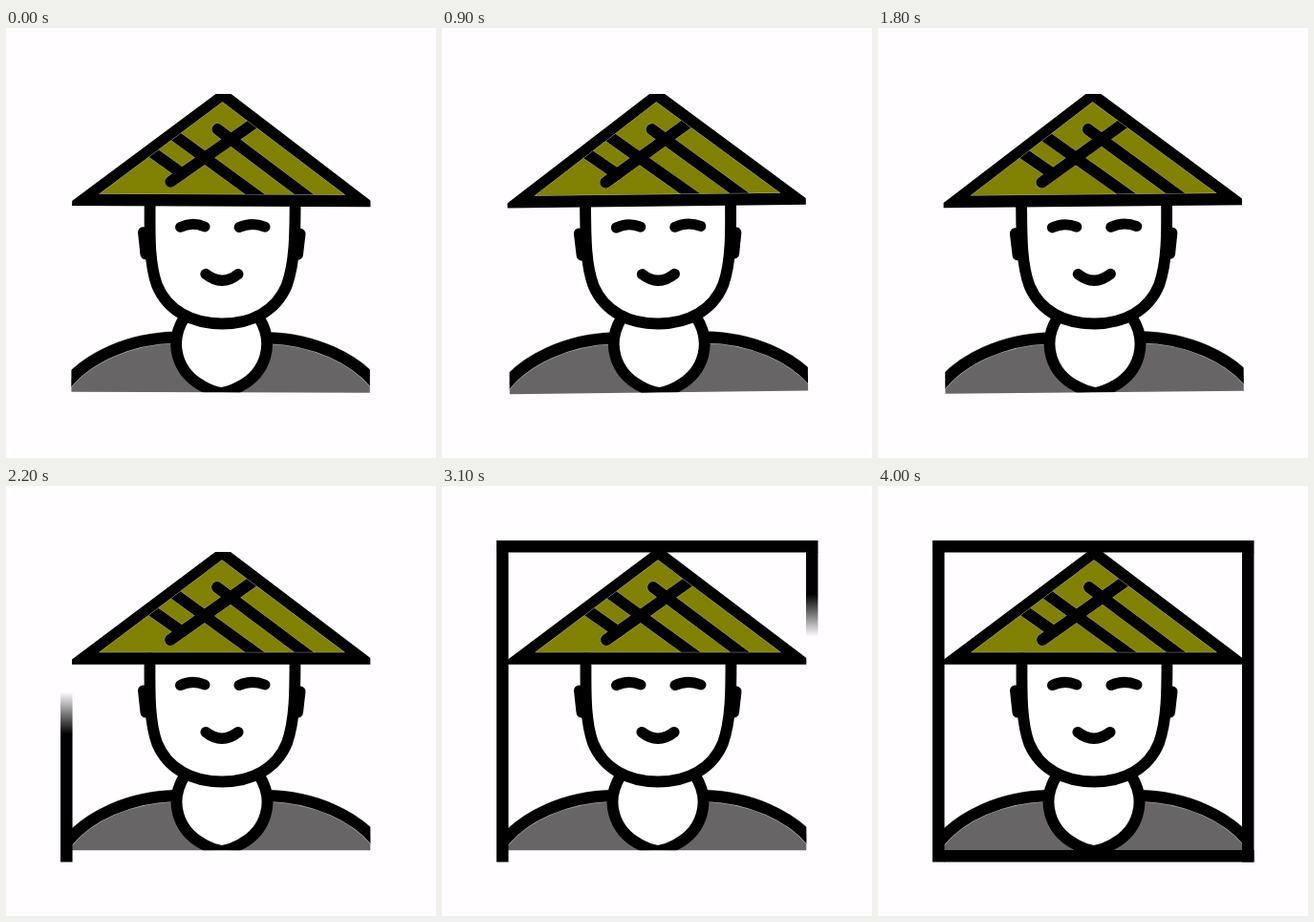
An HTML page with a canvas for the animation above (4100 ms loop, 450 by 450 pixels).

```html
<!DOCTYPE html>
<html lang="en">
<head>
<meta charset="utf-8">
<title>Portrait in a straw hat</title>
<style>
  html, body { margin: 0; height: 100%; overflow: hidden; background: #fffdff; }
  canvas { display: block; width: 450px; height: 450px; }
</style>
</head>
<body>
<canvas id="stage" width="450" height="450"></canvas>
<script>
const ctx = document.getElementById('stage').getContext('2d');
const LOOP = 4100, STEP = 100;
const INK = '#000', STRAW = '#808002', SHIRT = '#686567', PAPER = '#fffdff', EDGE = '#c0bfb4';

const line = (d, width, cap = 'round', color = INK) => {
  ctx.lineWidth = width;
  ctx.lineCap = cap;
  ctx.strokeStyle = color;
  ctx.stroke(new Path2D(d));
};
const fill = (d, color, rule = 'nonzero') => {
  ctx.fillStyle = color;
  ctx.fill(new Path2D(d), rule);
};

// Times at which the swing passes through upright; the sign alternates.
const UPRIGHT = [-20, 575, 940, 1390, 1840];
function swing(t) {
  const i = UPRIGHT.findIndex((z, k) => t >= z && t < UPRIGHT[k + 1]);
  if (i < 0) return 0;
  const phase = (t - UPRIGHT[i]) / (UPRIGHT[i + 1] - UPRIGHT[i]);
  return (i % 2 ? -2 : 2) * Math.sin(Math.PI * phase) * Math.PI / 180;
}

function drawShirt() {
  const left = 'M62 375C85 345 130 325 178 324';
  const right = 'M390 375C367 345 322 325 274 324';
  fill(left + 'L226 381L62 390Z', SHIRT);
  fill(right + 'L226 381L390 390Z', SHIRT);
  fill('M178 324H274L226 382Z', SHIRT);
  for (const d of [left, right]) line(d, 13, 'butt', EDGE);
  for (const d of [left, right]) line(d, 12, 'butt');
}

function drawHead() {
  const neck = 'M187 303C170 330 180 360 205 374Q215 380 226 382' +
               'Q237 380 247 374C272 360 282 330 265 303';
  fill(neck, '#fff');
  line(neck, 11.8);

  line('M143.5 214L146 237', 11);
  line('M308 215L305.5 237', 11);

  const face = 'M150.5 180C150.5 215 149.5 245 158 269C169 296 195 309.5 226 309.5' +
               'C257 309.5 283 296 294 269C302.5 245 302.5 215 302.5 180';
  fill(face, '#fff');
  line(face, 11.8);

  line('M182.5 208.5Q195 202.5 208 208', 11);
  line('M244 208.5Q257 202.5 271 208', 11);
  line('M209 257.5Q226 271 243 257.5', 11.2);
}

function drawHat() {
  const opening = 'M97 174.3L226 77.3L355 174.3Z';
  fill(opening, STRAW);
  const weave = [
    'M172 161L264 96',
    'M175 112L266 178',
    'M221 106L318 178.5',
    'M150 128.5L184 152.5'
  ];
  ctx.save();
  ctx.clip(new Path2D(opening));
  for (const d of weave) line(d, 12.6, 'round', EDGE);
  for (const d of weave) line(d, 12);
  ctx.restore();
  line(opening, 0.8, 'butt', EDGE);
  fill('M65 184.5L219 69H235L386 183.5V186.7H65Z' + opening, INK, 'evenodd');
}

function drawPerson(angle) {
  ctx.save();
  ctx.translate(225, 225);
  ctx.rotate(angle);
  ctx.translate(-225, -225);
  ctx.beginPath();
  ctx.rect(69, 68.5, 312.3, 312.8);
  ctx.clip();
  drawShirt();
  drawHead();
  drawHat();
  ctx.restore();
}

// Soft-edged wipe of one frame side, running from (x0, y0) to (x1, y1).
function drawSide(t, start, x0, y0, x1, y1) {
  const p = Math.min((t - start) / 500, 1);
  if (p <= 0) return;
  const soft = 44, length = Math.hypot(x1 - x0, y1 - y0);
  const ux = (x1 - x0) / length, uy = (y1 - y0) / length;
  const tip = p * (length + soft), solid = tip - soft;
  const fade = ctx.createLinearGradient(
    x0 + ux * solid, y0 + uy * solid, x0 + ux * tip, y0 + uy * tip);
  fade.addColorStop(0, 'rgba(0,0,0,1)');
  fade.addColorStop(1, 'rgba(0,0,0,0)');
  line(`M${x0} ${y0}L${x1} ${y1}`, 12.5, 'butt', fade);
}

function render(t) {
  ctx.fillStyle = PAPER;
  ctx.fillRect(0, 0, 450, 450);
  drawPerson(swing(t));
  drawSide(t, 1960, 63.3, 393.5, 63.3, 67);
  drawSide(t, 2463, 57, 63.2, 393.5, 63.2);
  drawSide(t, 2980, 387.2, 69, 387.2, 393.5);
  drawSide(t, 3500, 393.5, 387.2, 69, 387.2);
}

let began;
function tick(now) {
  began ??= now;
  const t = (now - began) % LOOP;
  render(Math.floor(t / STEP) * STEP);
  requestAnimationFrame(tick);
}
render(0);
requestAnimationFrame(tick);
</script>
</body>
</html>
```
